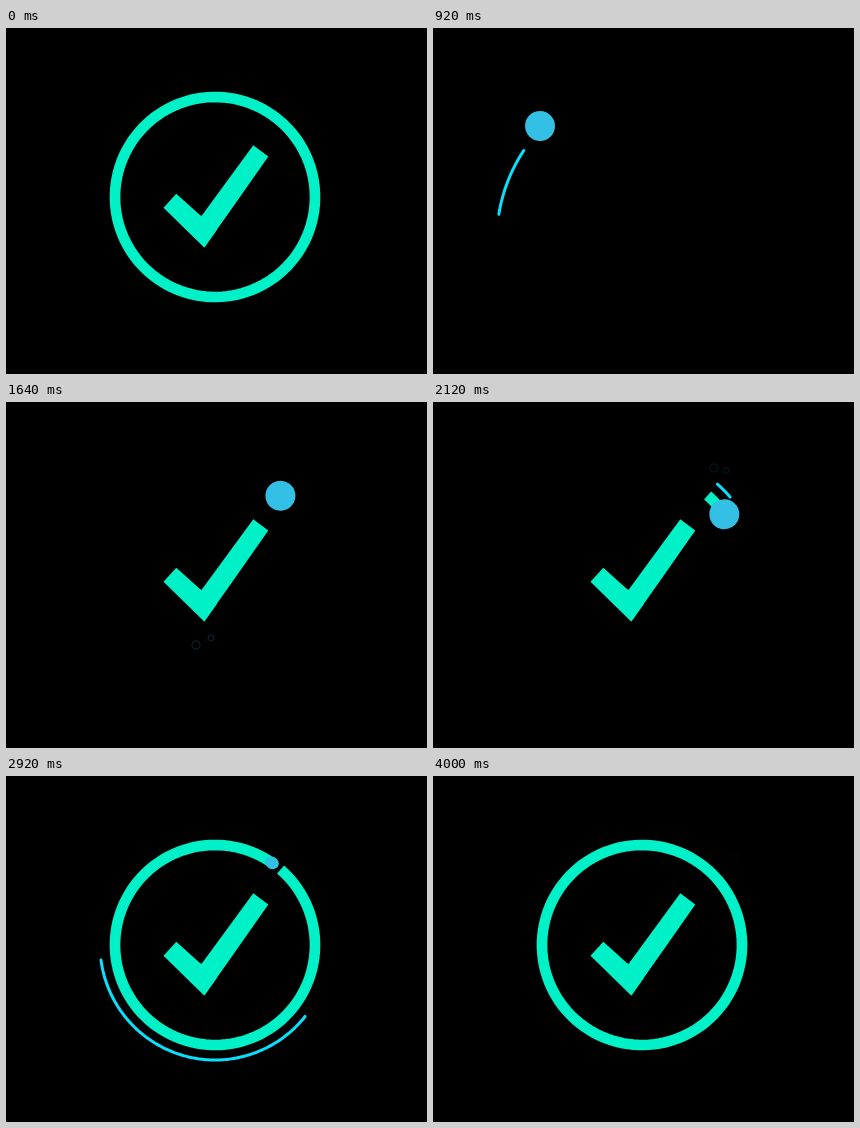
Animation, 421 px wide and 346 px high, one loop 4.1 s. Source, as an HTML page with a canvas:

```html
<!DOCTYPE html>
<html lang="en">
<head>
<meta charset="utf-8">
<title>Check mark</title>
<style>
  html, body { margin: 0; width: 100%; height: 100%; overflow: hidden; background: #000; }
  canvas { display: block; }
</style>
</head>
<body>
<canvas id="stage" width="421" height="346"></canvas>
<script>
const ctx = document.getElementById('stage').getContext('2d');
const GREEN = '#00f0c8', BLUE = '#33c0e4', CYAN = '#08e0fc';
const LOOP = 4100, STEP = 40, LAST = 4000;

// Moments at which the ball changes its way
const RISE = 520, FALL = 920, CLIMB = 1240, CLIMBED = 1700, ORBIT = 1960, CLOSED = 2940;
const CX = 209, CY = 169, RADIUS = 100, RING_START = -49;

const clamp = (v, lo, hi) => Math.min(hi, Math.max(lo, v));
const phase = (t, from, to) => clamp((t - from) / (to - from), 0, 1);
const easeOut = (u, power) => 1 - (1 - u) ** power;
const rad = deg => deg * Math.PI / 180;
const bezier = (a, b, c, d, s) => {
  const w = 1 - s;
  return a * w ** 3 + 3 * b * w * w * s + 3 * c * w * s * s + d * s ** 3;
};

// Slow start, fast middle, short stop: cubic-bezier(.78, .14, .72, .78)
function swing(u) {
  let lo = 0, hi = 1;
  for (let i = 0; i < 24; i++) {
    const mid = (lo + hi) / 2;
    if (bezier(0, .78, .72, 1, mid) < u) lo = mid; else hi = mid;
  }
  return bezier(0, .14, .78, 1, lo);
}

// Paths take a progress from 0 to 1 and give a point
const arc = (x, y, r, from, to) => u => {
  const a = rad(from + (to - from) * u);
  return [x + r * Math.cos(a), y + r * Math.sin(a)];
};
const line = (x0, y0, x1, y1) => u => [x0 + (x1 - x0) * u, y0 + (y1 - y0) * u];

const rise = arc(249, 195, 172, 146, 214.3);
const fall = u => [bezier(107, 130, 150, 197, u), bezier(98, 80, 175, 201.5, u)];
const climb = line(197, 201.5, 274.6, 93.5);
const orbit = arc(CX, CY, RADIUS, RING_START, RING_START + 360);
const orbitAt = t => swing(phase(t, ORBIT, CLOSED));

function ballAt(t) {
  if (t < FALL) return rise(easeOut(phase(t, RISE, FALL), 2));
  if (t < CLIMB) return fall(phase(t, FALL, CLIMB) ** 1.7);
  if (t < ORBIT) return climb(easeOut(phase(t, CLIMB, CLIMBED), 3));
  return orbit(orbitAt(t));
}

// Each trail's head and tail run the same way in their own time spans
const trails = [
  { path: arc(225.8, 212, 162, 151, 217), head: [520, 943], tail: [600, 1030] },
  { path: line(152, 185.5, 188.5, 220.5), head: [1140, 1340], tail: [1240, 1440] },
  { path: line(208, 217, 268, 133), head: [1240, 1540], tail: [1340, 1620] },
  { path: arc(CX, CY, 115, -49, 301), head: [1980, 3200], tail: [2430, 3370] }
];

// Pairs of bubbles: a large one, and a small one at an offset
const bursts = [
  { x: 102, y: 88, dx: 13, dy: -5.5, birth: 1000, life: 500 },
  { x: 190, y: 243, dx: 15, dy: -7, birth: 1300, life: 600 },
  { x: 281, y: 66, dx: 12, dy: 2.5, birth: 1800, life: 440 },
  { x: 301.5, y: 81.5, dx: -11.5, dy: 10.5, birth: 2960, life: 1100 }
];

function stroke(points, width, color, cap = 'butt') {
  ctx.beginPath();
  points.forEach(p => ctx.lineTo(...p));
  ctx.lineWidth = width;
  ctx.lineCap = cap;
  ctx.strokeStyle = color;
  ctx.stroke();
}

function strokePath(path, from, to, width, color, cap) {
  if (to - from < .003) return;
  const points = Array.from({ length: 121 }, (_, i) => path(from + (to - from) * i / 120));
  stroke(points, width, color, cap);
}

// The ball uncovers the check mark, first leg then second
function drawCheck(t) {
  const [x] = ballAt(t);
  if (t < FALL || x < 158) return;
  ctx.save();
  ctx.beginPath();
  [[170.3, 165.8], [195.3, 188.3], [247.3, 117.2], [262.3, 128.6], [198.4, 219.8], [157.5, 179.8]]
    .forEach(p => ctx.lineTo(...p));
  ctx.clip();
  const firstLeg = line(160, 169, 205.5, 212.5);
  stroke([firstLeg(0), firstLeg(phase(x, 158, 196))], 23, GREEN);
  if (t > CLIMB) stroke([climb(0), ballAt(Math.min(t, ORBIT))], 23, GREEN);
  ctx.restore();
}

function drawTrail({ path, head, tail }, t) {
  strokePath(path, swing(phase(t, ...tail)), swing(phase(t, ...head)), 3, CYAN, 'round');
}

function drawBurst({ x, y, dx, dy, birth, life }, t) {
  const u = (t - birth) / life;
  if (u < 0 || u > 1) return;
  const grow = Math.min(1, .5 + 2 * u);
  ctx.globalAlpha = .4 * (1 - u);
  strokePath(arc(x, y, 4 * grow, 0, 360), 0, 1, 1.3, BLUE);
  strokePath(arc(x + dx, y + dy, 2.8 * grow, 0, 360), 0, 1, 1.3, BLUE);
  ctx.globalAlpha = 1;
}

// The ball stretches along its way as it gets faster
function drawBall(t) {
  const size = 15 * Math.min(phase(t, 480, 560), 1 - phase(t, 2840, 2980));
  if (size <= 0) return;
  const [x, y] = ballAt(t), [px, py] = ballAt(t - STEP), [nx, ny] = ballAt(t + STEP);
  const speed = (Math.hypot(x - px, y - py) + Math.hypot(nx - x, ny - y)) / (2 * STEP);
  const stretch = clamp((speed - .35) * .72, 0, .48);
  ctx.beginPath();
  ctx.ellipse(x, y, size * (1 + stretch), size * (1 - stretch * .55),
    Math.atan2(ny - py, nx - px), 0, 2 * Math.PI);
  ctx.fillStyle = BLUE;
  ctx.fill();
}

function draw(t) {
  ctx.fillStyle = '#000';
  ctx.fillRect(0, 0, 421, 346);
  // The finished sign rests before the ball comes in
  const shown = t < RISE ? LAST : t;
  drawCheck(shown);
  strokePath(orbit, 0, orbitAt(shown), 10.7, GREEN);
  if (t < RISE) return;
  bursts.forEach(b => drawBurst(b, t));
  trails.forEach(tr => drawTrail(tr, t));
  drawBall(t);
}

function tick() {
  const t = performance.now() % LOOP;
  draw(Math.min(LAST, Math.floor(t / STEP) * STEP));
  requestAnimationFrame(tick);
}
tick();
</script>
</body>
</html>
```
